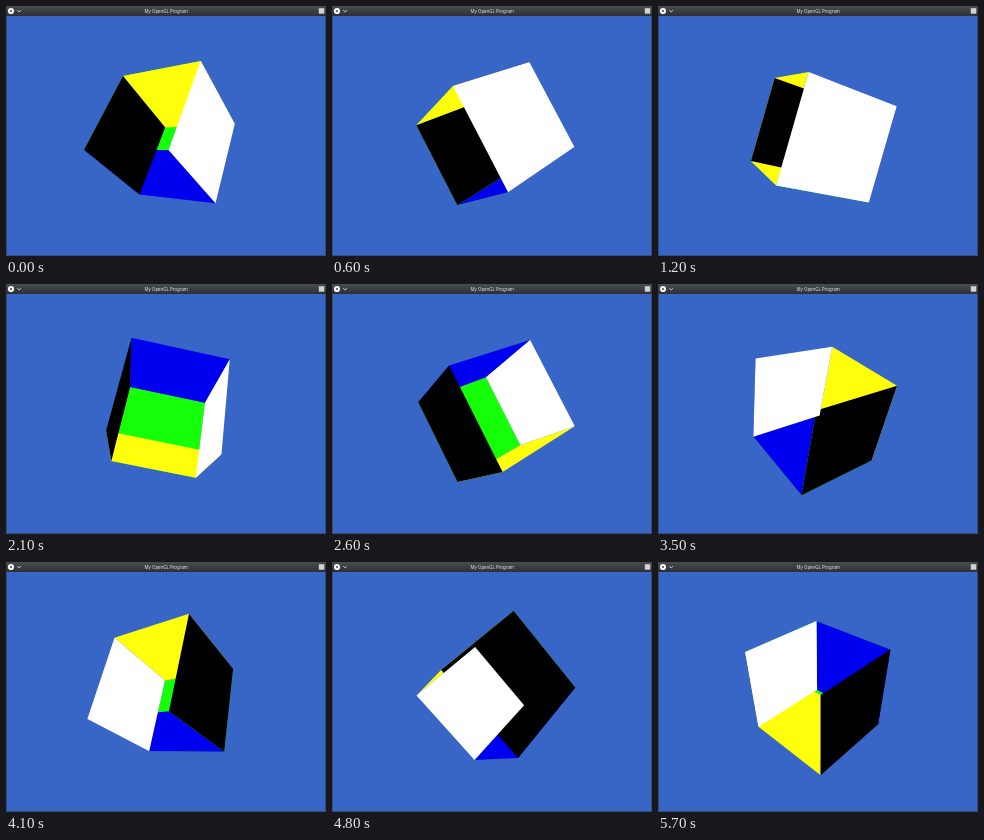
Animation of 320 by 250 pixels, one loop 5.8 s. Source, as an HTML page:

```html
<!DOCTYPE html>
<html lang="en">
<head>
<meta charset="utf-8">
<title>Spinning cube</title>
<style>
  html, body { margin: 0; width: 100%; height: 100%; overflow: hidden; background: #3766c6; }
  svg { display: block; width: 320px; height: 250px; }
  text { font: 4.4px "Noto Sans", "Open Sans", sans-serif; fill: #e4e6e7; text-anchor: middle; }
</style>
</head>
<body>
<svg viewBox="0 0 320 250">
  <defs>
    <linearGradient id="bar" x2="0" y2="1">
      <stop stop-color="#484d52"/>
      <stop offset="1" stop-color="#2c3034"/>
    </linearGradient>
  </defs>
  <rect width="320" height="250" fill="#3766c6"/>
  <g id="cube"></g>
  <rect x=".5" y=".5" width="319" height="249" fill="none" stroke="#30343a" stroke-opacity=".5"/>
  <rect width="320" height="10" fill="url(#bar)"/>
  <circle cx="5" cy="5" r="3.1" fill="#f2f3f3"/>
  <path d="M4 4l2 2m0-2l-2 2" stroke="#3a3f44" stroke-width=".7"/>
  <path d="M11.2 4.2l1.9 1.8 1.9-1.8" fill="none" stroke="#e4e6e7" stroke-width=".8"/>
  <text x="160.3" y="6.7">My OpenGL Program</text>
  <rect x="312.8" y="2.2" width="5.5" height="5.5" fill="#d0d2d3"/>
</svg>
<script>
const LOOP = 5800, STEP = 100;
const FOCAL = 289.7, DIST = 3.12, CX = 160.4, CY = 129.7;

// Fixed outer axis and two directions perpendicular to it, seen from the camera.
const AXIS = [.5, .291, .816], E1 = [.314, .816, -.485], E2 = [-.807, .499, .317];

// Slightly uneven clock, about 45 degrees per second: [seconds, degrees].
const CLOCK = [[0, 0], [1.2, 53.1], [2.1, 95], [2.6, 116.1], [3.5, 158], [4.8, 214.5], [5.7, 254.2]];

// Painted in this order without a depth test: colour, axis index, side.
const FACES = [
  ['#14ff08', 2, 1], ['#0000f0', 1, -1], ['#ffff0c', 1, 1], ['#000', 0, -1], ['#fff', 0, 1]
];
const CORNERS = [[1, 1], [1, -1], [-1, -1], [-1, 1]];

const polygons = FACES.map(([color]) => {
  const p = document.createElementNS('http://www.w3.org/2000/svg', 'polygon');
  p.setAttribute('fill', color);
  return document.getElementById('cube').appendChild(p);
});

const mix = (a, u, b, v) => a.map((x, i) => x * u + b[i] * v);
const rad = deg => deg * Math.PI / 180;

function turnAt(s) {
  let i = 1;
  while (i < CLOCK.length - 1 && s > CLOCK[i][0]) i++;
  const [s0, d0] = CLOCK[i - 1], [s1, d1] = CLOCK[i];
  return d0 + (d1 - d0) * (s - s0) / (s1 - s0);
}

// Inner spin about the cube's own axis, outer spin twice as fast about AXIS.
function cubeAxes(turn) {
  const a = rad(.4 + 2 * turn), b = rad(28 - turn);
  const y = mix(E1, Math.cos(a), E2, Math.sin(a));
  const m = mix(E2, Math.cos(a), E1, -Math.sin(a));
  return [
    mix(AXIS, Math.cos(b), m, -Math.sin(b)),
    y,
    mix(AXIS, Math.sin(b), m, Math.cos(b))
  ];
}

function project([x, y, z]) {
  const k = FOCAL / (DIST - z);
  return (CX + x * k).toFixed(2) + ',' + (CY - y * k).toFixed(2);
}

function draw(ms) {
  const axes = cubeAxes(turnAt(Math.floor(ms % LOOP / STEP) * STEP / 1000));
  FACES.forEach(([, i, side], n) => {
    const u = axes[(i + 1) % 3], v = axes[(i + 2) % 3];
    const points = CORNERS.map(([p, q]) =>
      project(mix(axes[i], side / 2, mix(u, p, v, q), .5)));
    polygons[n].setAttribute('points', points.join(' '));
  });
}

const start = performance.now();
function tick() {
  draw(performance.now() - start);
  requestAnimationFrame(tick);
}
tick();
</script>
</body>
</html>
```
